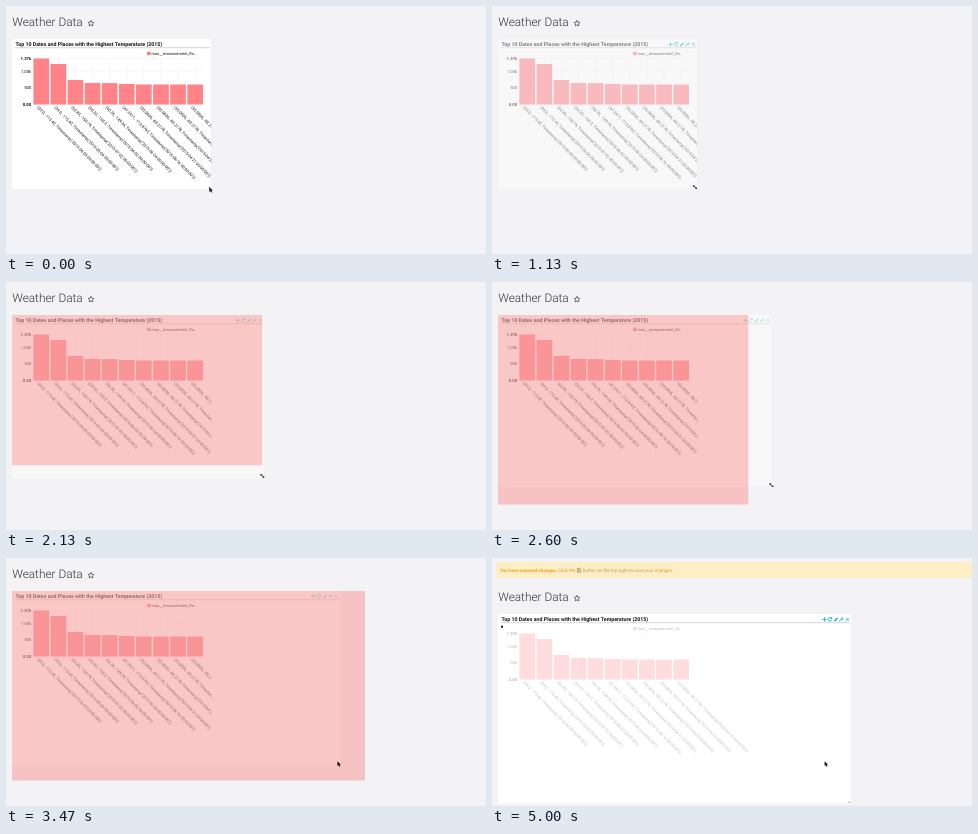
An HTML page that plays this animation: 480x248 px, repeating every 5070 ms.

```html
<!DOCTYPE html>
<html lang="en">
<head>
<meta charset="utf-8">
<title>Weather Data</title>
<style>
  html, body { margin: 0; width: 100%; height: 100%; overflow: hidden; background: #f3f2f4; }
  svg { display: block; width: 480px; height: 248px; }
  text { font-family: Roboto, Arial, sans-serif; fill: #111; text-rendering: geometricPrecision; white-space: pre; }
  .bold { font-weight: 700; }
  .icon { fill: none; stroke: #00b3a4; stroke-width: .8; }
  .note text { font-size: 4.58px; fill: #c79c3e; }
  .note .bold { fill: #eba51c; }
</style>
</head>
<body>
<svg viewBox="0 0 480 248">
  <defs>
    <clipPath id="clip"><rect id="clipBox" x="6" y="33" width="199.5" height="190"/></clipPath>
  </defs>

  <g id="note" class="note">
    <rect x="4" y="4" width="480" height="16" rx="1" fill="#fdeec5"/>
    <text class="bold" x="8" y="13.6">You have unsaved changes.</text>
    <text x="66" y="13.6">Click the</text>
    <path d="M85.3 10.2h2.6l1 1v3h-3.6zM86 10.2v1.3h1.6v-1.3M86.1 14.2v-1.5h2v1.5" fill="none" stroke="#a88c4c" stroke-width=".6"/>
    <text x="90.7" y="13.6">button on the top right to save your changes.</text>
  </g>

  <g id="page">
    <text x="6.2" y="20.1" font-size="11.85" font-weight="300" style="fill:#333">Weather Data</text>
    <path id="star" fill="none" stroke="#444" stroke-width=".75"/>
    <g id="widget">
      <rect id="panel" x="6" y="33" fill="#fff"/>
      <path id="rule" fill="none" stroke="#c4c4c4" stroke-width=".7"/>
      <text class="bold" x="9.5" y="40.3" font-size="5.28">Top 10 Dates and Places with the Highest Temperature (2015)</text>
      <g id="chart" clip-path="url(#clip)"></g>
      <g id="icons" class="icon">
        <path d="M-28.7 38.4h4.4M-26.5 36.2v4.4"/>
        <path d="M-19.5 37.3a1.8 1.8 0 1 0 .2 1.7M-19.3 36v1.6h-1.5"/>
        <path d="M-16.7 40.2l3.2-3.2" stroke-width="1.3"/>
        <path d="M-11.5 40.3q0-2.6 3.2-2.6M-9.3 36.2l1.6 1.5l-1.6 1.5"/>
        <path d="M-4.9 37l2.8 2.8M-2.1 37l-2.8 2.8"/>
      </g>
      <path id="grip" fill="none" stroke="#888" stroke-width=".6" d="M-2.5 -1h1.5v-1.5"/>
    </g>
    <rect id="ghost" x="6" y="33" fill="#f00" fill-opacity=".2"/>
  </g>

  <rect id="dot" width="2" height="2" x="-1" y="-1" fill="#111"/>
  <path id="arrow" d="M0 0V4.9L1.1 3.9L1.9 5.6L2.9 5.2L2.1 3.6H3.5Z" fill="#111"/>
  <g id="sizer" stroke="#111" fill="#111">
    <path d="M-1.3 -1.3L1.3 1.3" stroke-width=".9"/>
    <path d="M-1.9 -1.9h1.8l-1.8 1.8zM1.9 1.9h-1.8l1.8 -1.8z" stroke="none"/>
  </g>
</svg>
<script>
const LOOP = 5070, DROP = 3730, SHIFT = 23, BASE = 98.5;
const $ = id => document.getElementById(id);
const put = (el, attrs) => { for (const k in attrs) el.setAttribute(k, attrs[k]); return el; };
const show = (el, on) => put(el, { visibility: on ? 'visible' : 'hidden' });

function add(tag, attrs, text) {
  const el = put(document.createElementNS('http://www.w3.org/2000/svg', tag), attrs);
  if (text) el.textContent = text;
  return $('chart').appendChild(el);
}
const gridLine = d => add('path', { d, stroke: '#eee', 'stroke-width': .5 });

// height above the axis, place, month and day
const bars = [
  [46, '39.0, -115.42', '06-05'], [40.5, '39.0, -115.42', '05-04'],
  [24.5, '62.83, -150.78', '07-02'], [21.6, '60.32, -160.2', '06-02'],
  [21.4, '60.26, -149.34', '06-24'], [20.5, '47.2411, -113.8762', '08-16'],
  [20, '35.0836, -83.2178', '04-21'], [20, '35.0836, -83.2178', '04-20'],
  [20, '35.0836, -83.2178', '04-22'], [20, '35.0836, -83.2178', '04-15']
];

function buildChart() {
  [['1.37k', 46, 1], ['1.00k', 33.5], ['500', 17], ['0.00', 0, 1]].forEach(([label, h, strong]) => {
    const y = BASE - h;
    gridLine(`M27 ${y}H198`);
    add('text', { x: 25.2, y: y + 1.5, 'font-size': 4.2, 'text-anchor': 'end', class: strong ? 'bold' : '' }, label);
  });
  bars.forEach(([h, place, day], i) => {
    const x = 27.4 + i * 17.1;
    gridLine(`M${x + 7.8} 52.5V${BASE}`);
    add('rect', { x, y: BASE - h, width: 15.7, height: h, fill: '#ff8387' });
    add('text', { 'font-size': 4.05, transform: `translate(${x + 3.4} 101.8) rotate(45)` },
      `(${place}, Timestamp('2015-${day} 00:00:00'))`);
  });
  add('circle', { cx: 142.8, cy: 47.6, r: 2, fill: '#ff7c81' });
  add('text', { x: 145.6, y: 49, 'font-size': 4 }, 'max__measurement_fla...');
}

function buildStar() {
  const pts = Array.from({ length: 10 }, (_, i) => {
    const a = i * Math.PI / 5 - Math.PI / 2, r = i % 2 ? 1.5 : 3.1;
    return `${85 + r * Math.cos(a)} ${17.4 + r * Math.sin(a)}`;
  });
  put($('star'), { d: `M${pts.join('L')}Z` });
}

// each row: time, then values; linear in between
function track(rows, t) {
  const i = rows.findIndex(r => r[0] > t);
  if (i < 0) return rows[rows.length - 1].slice(1);
  if (i === 0) return rows[0].slice(1);
  const a = rows[i - 1], b = rows[i], k = (t - a[0]) / (b[0] - a[0]);
  return a.slice(1).map((v, j) => v + (b[j + 1] - v) * k);
}

const ramp = (t, from, ms) => {
  const k = Math.min(1, Math.max(0, (t - from) / ms));
  return k * k * (3 - 2 * k);
};

const corner = [
  [1200, 205, 183], [1470, 212, 185.5], [1600, 216, 187], [1800, 234, 188.5],
  [2000, 253.5, 190.5], [2300, 264, 202.5], [2530, 275, 204.5], [2600, 279.5, 205],
  [3070, 322, 206], [3330, 333, 207], [3470, 334, 207]
];
const spin = [
  [3730, 10, 68.7], [3950, 10, 72], [4100, 13, 72], [4250, 13, 69], [4330, 10, 69],
  [4470, 10, 73], [4600, 13, 73], [4720, 13, 69], [4790, 10, 69], [4900, 9.5, 70], [5000, 10, 68.7]
];

function draw(t) {
  const done = t >= DROP, dragging = t >= 1000 && !done;
  const [right, bottom] = done ? [359, 222.5] : track(corner, t);

  put($('page'), { transform: `translate(0 ${done ? SHIFT : 0})` });
  show($('note'), done);
  put($('panel'), { width: right - 6, height: bottom - 33 });
  put($('rule'), { d: `M9 41.7H${right - 1}` });
  put($('clipBox'), { width: done ? 353 : 199.5 });
  put($('widget'), { opacity: done ? 1 : 1 - .5 * ramp(t, 1000, 130) });
  put($('chart'), { opacity: done ? .27 : 1 });
  put($('grip'), { transform: `translate(${right} ${bottom})` });

  const fade = done ? ramp(t, 3760, 440) : ramp(t, 270, 460);
  put($('icons'), { transform: `translate(${right} 0)`, opacity: fade * (dragging && t > 1270 ? .6 : 1) });

  const cols = ramp(t, 1765, 100) + ramp(t, 2630, 100) + ramp(t, 3335, 100);
  put($('ghost'), { width: 199 + 51.3 * cols, height: 150.2 + 39.3 * ramp(t, 2320, 100) });
  show($('ghost'), dragging && t >= 1260);

  const resizing = t >= 330 && t < 3460;
  show($('sizer'), resizing);
  show($('arrow'), !resizing);
  put($('sizer'), { transform: `translate(${right - 2 + 1.8 * ramp(t, 2000, 600)} ${bottom - 1.8})` });
  const tip = t < 330 ? '203.3 181' : done ? '332.6 203.2' : '331.4 203.2';
  put($('arrow'), { transform: `translate(${tip})` });

  show($('dot'), done);
  put($('dot'), { transform: `translate(${track(spin, t).join(' ')})` });
}

buildChart();
buildStar();
const start = performance.now();
function tick() {
  draw((performance.now() - start) % LOOP);
  requestAnimationFrame(tick);
}
tick();
</script>
</body>
</html>
```
